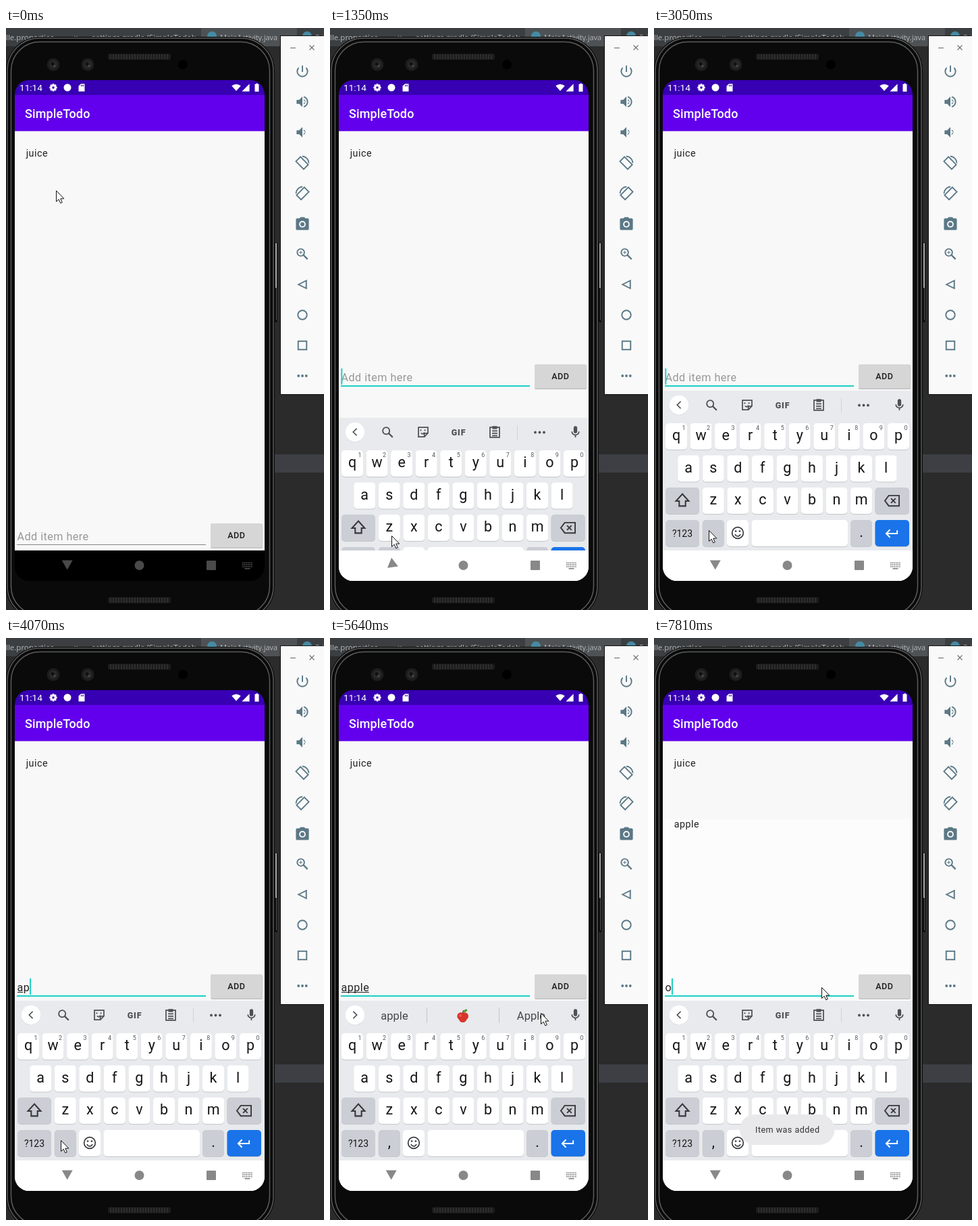
These frames come from a looping animation (471x860 px, 8000 ms). An HTML page with a canvas:

```html
<!DOCTYPE html>
<html lang="en">
<head>
<meta charset="utf-8">
<title>Todo list on a phone</title>
<style>
html, body { margin: 0; width: 100%; height: 100%; overflow: hidden; background: #2b2b2b; }
canvas { display: block; }
</style>
</head>
<body>
<canvas id="stage" width="471" height="860"></canvas>
<script>
const LOOP = 8000, STEP = 130, BLINK = 490;
const FOCUS = 950, OPEN = 1350, ADDED = 6680, RETYPE = 7810;
const WORD = 'apple';
const KEYS = [3930, 4070, 4440, 4560, 4680];
// Mouse stops: time, x, y
const STOPS = [[0, 74, 240], [130, 87, 265], [260, 94, 548], [520, 120, 720], [780, 100, 757], [1250, 100, 757],
  [1430, 81, 742], [5070, 81, 742], [5880, 346, 526], [6760, 346, 526], [7150, 248, 516]];
const PI = Math.PI;
const c = document.getElementById('stage').getContext('2d');

const span = (t, a, b) => Math.min(1, Math.max(0, (t - a) / (b - a)));
const gray = v => `rgb(${v},${v},${v})`;

function mouse(t) {
  const now = Math.floor((t + 10) / STEP) * STEP;
  let i = 0;
  while (i < STOPS.length - 2 && STOPS[i + 1][0] <= now) i++;
  const [a, x, y] = STOPS[i], [b, x2, y2] = STOPS[i + 1];
  const u = 1 - (1 - span(now, a, b)) ** 2;
  return [Math.round(x + (x2 - x) * u), Math.round(y + (y2 - y) * u)];
}
function typedCount(t) {
  return KEYS.filter(k => k <= t).length;
}
function typed(t) {
  if (t >= RETYPE) return 'o';
  return t < ADDED ? WORD.slice(0, typedCount(t)) : '';
}
function caretOn(t) {
  if (t < FOCUS) return false;
  const last = [FOCUS + STEP, ...KEYS, ADDED].filter(k => k <= t).pop() || t;
  return Math.floor((t - last) / BLINK) % 2 === 0;
}
function suggestions(t) {
  const n = typedCount(t - 120);
  if (n < 2 || t >= 7040) return null;
  if (n === WORD.length) return [WORD, null, 'Apple'];
  return [WORD.slice(0, n), WORD.slice(0, n + 1), 'application'];
}

function rect(x, y, w, h, color = c.fillStyle) {
  c.fillStyle = color;
  c.fillRect(x, y, w, h);
}
function round(x, y, w, h, r, color = c.fillStyle) {
  c.beginPath();
  c.roundRect(x, y, w, h, r);
  c.fillStyle = color;
  c.fill();
}
function dot(x, y, r, color = c.fillStyle) {
  c.beginPath();
  c.arc(x, y, r, 0, 7);
  c.fillStyle = color;
  c.fill();
}
function arc(x, y, r, from = 0, to = 2 * PI) {
  c.beginPath();
  c.arc(x, y, r, from, to);
  c.stroke();
}
function poly(points) {
  c.beginPath();
  points.forEach(([x, y]) => c.lineTo(x, y));
  c.closePath();
}
function fillPoly(...points) {
  poly(points);
  c.fill();
}
function outline(...points) {
  poly(points);
  c.stroke();
}
function pen(...points) {
  c.beginPath();
  points.forEach(([x, y]) => c.lineTo(x, y));
  c.stroke();
}
function text(s, x, y, size, color, { weight = 400, align = 'left', gap = 0, family = 'Roboto' } = {}) {
  c.font = `${weight} ${size}px ${family}, sans-serif`;
  c.letterSpacing = gap + 'px';
  c.textAlign = align;
  c.fillStyle = color;
  c.fillText(s, x, y);
}

// Icons are drawn on a 24 unit grid around the centre
function icon(draw, x, y, size, color, flip = 1) {
  c.save();
  c.translate(x, y);
  c.scale(size / 24 * flip, size / 24);
  c.fillStyle = c.strokeStyle = color;
  c.lineWidth = 2;
  draw();
  c.restore();
}
function cross(x, y, r) {
  pen([x - r, y - r], [x + r, y + r]);
  pen([x - r, y + r], [x + r, y - r]);
}
function power() {
  arc(0, 0, 8, -PI / 4, PI * 1.25);
  pen([0, -9], [0, 1]);
}
function speaker() {
  fillPoly([-9, -3], [-5, -3], [0, -8], [0, 8], [-5, 3], [-9, 3]);
  c.beginPath();
  c.arc(.3, 0, 4.3, -1.2, 1.2);
  c.arc(2, 0, 2, 1.57, -1.57, true);
  c.fill();
}
function loud() {
  speaker();
  arc(0, 0, 8, -1.3, 1.3);
}
function turn() {
  outline([-10, -2], [-3, -9], [9, 3], [2, 10]);
  arc(-1, 1, 11, -1.5, -.05);
}
function camera() {
  fillPoly([-3, -10], [3, -10], [6, -6], [-6, -6]);
  round(-10, -8, 20, 18, 2);
  arc(0, 1, 4.1);
  c.strokeStyle = '#f9f9f9';
  arc(0, 1, 4.1);
}
function search() {
  arc(-2.5, -2.5, 5.5);
  c.lineWidth = 2.4;
  pen([1.5, 1.5], [8, 8]);
}
function zoom() {
  search();
  rect(-5, -3, 5, 1);
  rect(-3, -5, 1, 5);
}
function gear() {
  for (let i = 0; i < 8; i++) {
    c.rotate(PI / 4);
    rect(-2.4, -10, 4.8, 5);
  }
  c.lineWidth = 5;
  arc(0, 0, 5.6);
}
function card() {
  fillPoly([-2, -10], [8, -10], [8, 10], [-8, 10], [-8, -4]);
  for (const x of [-2, 1, 4]) rect(x, -7, 1.6, 4, '#3700b3');
}
function wifi() {
  c.beginPath();
  c.moveTo(0, 9);
  c.arc(0, 9, 18, -2.3, -.84);
  c.fill();
}
function mic() {
  round(-3, -10, 6, 12, 3);
  arc(0, -1, 6, 0, PI);
  pen([0, 5], [0, 9]);
}
function erase() {
  outline([-11, 0], [-5, -8], [11, -8], [11, 8], [-5, 8]);
  cross(2, 0, 3.5);
}
function enter() {
  pen([8, -5], [8, 0], [-8, 0]);
  pen([-3, -6], [-9, 0], [-3, 6]);
}
function shift() {
  outline([0, -9], [-9, 1], [-4.5, 1], [-4.5, 8], [4.5, 8], [4.5, 1], [9, 1]);
}
function board() {
  c.strokeRect(-8, -8, 16, 17);
  rect(-4, -10, 8, 5);
  for (const y of [-2, 2, 6]) pen([-4.5, y], [4.5, y]);
}
function sticker() {
  outline([-8, -8], [8, -8], [8, 2], [2, 8], [-8, 8]);
  pen([2, 8], [2, 2], [8, 2]);
  arc(-1, 0, 3, .2, 2.6);
  for (const x of [-4, 3]) dot(x, -3, 1.2);
}
function smile() {
  arc(0, 0, 10);
  arc(0, 1, 5, .3, PI - .3);
  for (const x of [-3.5, 3.5]) dot(x, -3, 1.6);
}

function backdrop() {
  rect(0, 0, 471, 860, '#2b2b2b');
  rect(0, 0, 471, 27, '#3c3f41');
  rect(289, 0, 142, 27, '#4e5254');
  const label = (s, x, size = 11.5) => text(s, x, 18, size, '#b4b8ba', { family: 'Open Sans' });
  label('lle.properties', 0);
  label('settings.gradle (SimpleTodo)', 127);
  label('MainActivity.java', 317, 11);
  label('Ed', 458, 11);
  for (const x of [100, 275, 411]) label('×', x);
  for (const x of [305, 446]) dot(x, 12, 7, '#468aa3');
  rect(390, 630, 81, 27, '#3d3f45');
}

function grill(y) {
  round(151, y, 93, 9, 3, '#1c1c1c');
  for (let x = 154; x < 242; x += 4) rect(x, y + 1, 2, 7, '#2d2d2d');
}
function phone() {
  round(398, 317, 4, 118, 2, '#0c0c0c');
  rect(400, 384, 1, 48, '#555');
  rect(399, 318, 2, 66, '#aaa');
  round(0, 13, 398, 862, 50, '#0a0a0a');
  for (const inset of [2, 7.5]) {
    c.beginPath();
    c.roundRect(inset, 13 + inset, 398 - 2 * inset, 862 - 2 * inset, 50 - inset);
    c.strokeStyle = '#5a5b5c';
    c.lineWidth = 1.5;
    c.stroke();
  }
  grill(38);
  grill(841);
  for (const x of [70, 121]) {
    dot(x, 54, 9.5, '#1d1d1e');
    dot(x, 54, 6, '#2a2a2c');
    dot(x - 1, 53, 2.5, '#111');
    dot(x + 2, 56, 1.2, '#555');
  }
  dot(262, 54, 7, '#000');
}

function panel() {
  rect(406, 11, 65, 531, '#111');
  rect(407, 12, 64, 529, '#f9f9f9');
  const ink = '#5b7886', x = 439;
  c.strokeStyle = '#777';
  c.lineWidth = 1.2;
  pen([421, 29.5], [429, 29.5]);
  cross(453, 29, 3.5);
  const back = () => outline([-6, 0], [6, -6], [6, 6]);
  const home = () => arc(0, 0, 7);
  const recent = () => c.strokeRect(-6.5, -6.5, 13, 13);
  const more = () => [-6, 0, 6].forEach(d => dot(d, 0, 2));
  [power, loud, speaker, turn, turn, camera, zoom, back, home, recent, more].forEach((draw, i) =>
    icon(draw, x, 64 + 45 * i, 23, ink, i === 4 ? -1 : 1));
}

function header() {
  rect(13, 77, 370, 22, '#3700b3');
  rect(13, 99, 370, 53.4, '#6200ee');
  text('11:14', 20, 93, 13.6, '#fff');
  icon(gear, 70, 88, 13.5, '#fff');
  dot(91, 88, 5.5, '#fff');
  icon(card, 112, 88, 13.5, '#fff');
  icon(wifi, 341, 88, 13.5, '#fff');
  icon(() => fillPoly([-10, 10], [10, 10], [10, -10]), 355, 88, 13.5, '#fff');
  rect(368.5, 83, 6, 11, '#fff');
  rect(370, 82, 3, 1);
  text('SimpleTodo', 28, 133, 18, '#fff', { weight: 500, gap: .12 });
}

function inputRow(t) {
  const teal = '#1dd0c3', ink = '#222', word = typed(t);
  const press = t < ADDED ? 0 : 1 - span(t, ADDED, 7040);
  c.save();
  if (t >= OPEN) c.translate(0, -235);
  round(303, 733, 77, 36, 2, gray(194 - 40 * press));
  round(303, 732, 76.5, 35.5, 2, gray(214 - 28 * press));
  if (t >= 6430 && t < ADDED) dot(341, 751, 16, '#c8c9c9');
  text('ADD', 341.3, 753.5, 12.6, '#1d1d1d', { weight: 500, align: 'center', gap: .5 });
  if (t >= FOCUS) rect(16, 763, 280, 2, teal);
  else rect(16, 763, 280, 1, '#858585');
  text(word || 'Add item here', 16.5, 756.5, 16.2, word ? ink : '#989898', { gap: .45 });
  const width = s => c.measureText(s).width;
  const marked = word.slice(0, typedCount(t - 120));
  if (marked && t < ADDED) rect(17, 758, width(marked) - 1, 1, ink);
  if (caretOn(t)) rect(16.3 + width(word), 738, 2, 24, teal);
  c.restore();
}

function apple() {
  const red = '#d9352c';
  for (const x of [-3, 3]) dot(x, 1, 6.5, red);
  dot(0, 5, 6.5, red);
  dot(-4, 0, 2, '#ef6a58');
  pen([0, -4], [1, -9]);
  c.beginPath();
  c.ellipse(4, -8, 4, 2, -.5, 0, 7);
  c.fillStyle = '#5c9b3a';
  c.fill();
}
function strip(words) {
  const ink = '#4d5156', d = words ? 1 : -1;
  dot(37, 558, 14.3, '#d6d8db');
  dot(37, 557.3, 14.2, '#fff');
  icon(() => pen([-3, -6], [3, 0], [-3, 6]), 37, 557, 21, ink, d);
  icon(mic, 363.5, 557, 21, ink);
  if (words) {
    for (const x of [143, 250]) rect(x, 546, 1, 23, '#c4c7cb');
    words.forEach((w, i) => {
      const x = 95.5 + 101.2 * i;
      if (w) text(w, x, 563.7, 16.5, '#43474b', { align: 'center' });
      else icon(apple, x, 558, 21, '#74492b');
    });
    return;
  }
  icon(search, 85.5, 557.5, 22, ink);
  icon(sticker, 138, 557, 21, ink);
  text('GIF', 190.5, 561.5, 12.5, ink, { weight: 800, align: 'center', gap: .8 });
  icon(board, 244, 557, 21, ink);
  rect(277, 547, 1, 21, '#cfd1d5');
  for (const x of [304, 310.5, 317]) dot(x, 557.5, 1.9, ink);
}
function key(x, y, w, label, color = '#fff', size = 21.5) {
  round(x, y + 1, w, 39, 5, '#c3c6ca');
  round(x, y, w, 39, 5, color);
  text(label, x + w / 2, y + 25, size, '#161616', { align: 'center' });
}
function keyboard(t) {
  const dark = '#cbced4', ink = '#37393c';
  c.save();
  c.translate(0, t < 1500 ? 40 : 0);
  rect(13, 536, 370, 281, '#e8eaed');
  strip(suggestions(t));
  ['qwertyuiop', 'asdfghjkl', 'zxcvbnm'].forEach((letters, row) => {
    const left = [17, 35.2, 71.8][row], y = 584 + 47.5 * row;
    [...letters].forEach((k, i) => {
      const x = left + 36.55 * i;
      key(x, y, 32, k);
      if (!row) text((i + 1) % 10, x + 27, 594, 9, '#55585c', { align: 'center' });
    });
  });
  key(17, 679, 50, '', dark);
  icon(shift, 42, 698, 25, ink);
  key(327.5, 679, 50.5, '', dark);
  icon(erase, 352.5, 698.5, 23, ink);
  key(17, 727, 50, '?123', dark, 14);
  key(71.8, 727, 32, t < 5240 ? '' : ',', dark);
  key(108, 727, 32, '');
  icon(smile, 124, 746, 20, ink);
  key(144.5, 727, 142.5, '');
  key(291, 727, 32, '.', dark);
  key(327.5, 727, 50.5, '', '#1a73e8');
  icon(enter, 352.5, 747, 23, '#fff');
  c.restore();
}

function navBar(t) {
  const light = t >= OPEN;
  rect(13, 772, 370, 45, light ? '#fff' : '#000');
  const ink = gray(light ? 0x88 : 0x4a + 0x50 * span(t, 820, 1200));
  const down = t < OPEN ? 1 - span(t, 820, 1200) : span(t, 1200, 1560);
  c.save();
  c.translate(90.7, 793.2);
  c.rotate(-down * PI / 2);
  c.fillStyle = ink;
  fillPoly([-7.3, 0], [6.7, -8], [6.7, 8]);
  c.restore();
  dot(197.5, 794, 7, ink);
  round(297, 787, 14, 14, 1, ink);
  for (let y = 0; y < 3; y++)
    for (let x = 0; x < 6; x++) rect(350 + 2.6 * x, 789.5 + 2.8 * y, 1.7, 1.7);
  rect(353.5, 798, 8, 1.7);
}

function faded(alpha, draw) {
  c.globalAlpha = alpha;
  draw();
  c.globalAlpha = 1;
}
function toast() {
  round(127, 704, 140.5, 45, 22.5, '#e9e9eb');
  text('Item was added', 150, 731, 12.6, '#333', { gap: .45 });
}
function listItem(s, y) {
  text(s, 29.7, y, 14.4, '#222', { gap: .45 });
}

function pointer([x, y]) {
  c.save();
  c.translate(x + .5, y + .5);
  poly([[0, 0], [0, 16], [3.7, 12.7], [6.3, 18.3], [8.8, 17.2], [6.3, 11.6], [11.3, 11.6]]);
  c.fillStyle = '#fff';
  c.fill();
  c.strokeStyle = '#111';
  c.lineWidth = 1;
  c.stroke();
  c.restore();
}

function draw(t) {
  backdrop();
  phone();
  panel();
  c.save();
  c.beginPath();
  c.roundRect(13, 77, 370, 740, 21);
  c.clip();
  rect(13, 152, 370, 620, '#f8f8f8');
  const shown = span(t, 6650, 7040);
  faded(shown, () => rect(13, 268, 370, 268, '#fcfcfc'));
  header();
  listItem('juice', 189.7);
  faded(shown, () => listItem(WORD, 280));
  inputRow(t);
  if (t >= OPEN) keyboard(t);
  navBar(t);
  faded(span(t, 6800, 7190), toast);
  c.restore();
  pointer(mouse(t));
}

const begin = performance.now();
function tick() {
  draw((performance.now() - begin) % LOOP);
  requestAnimationFrame(tick);
}
tick();
</script>
</body>
</html>
```
